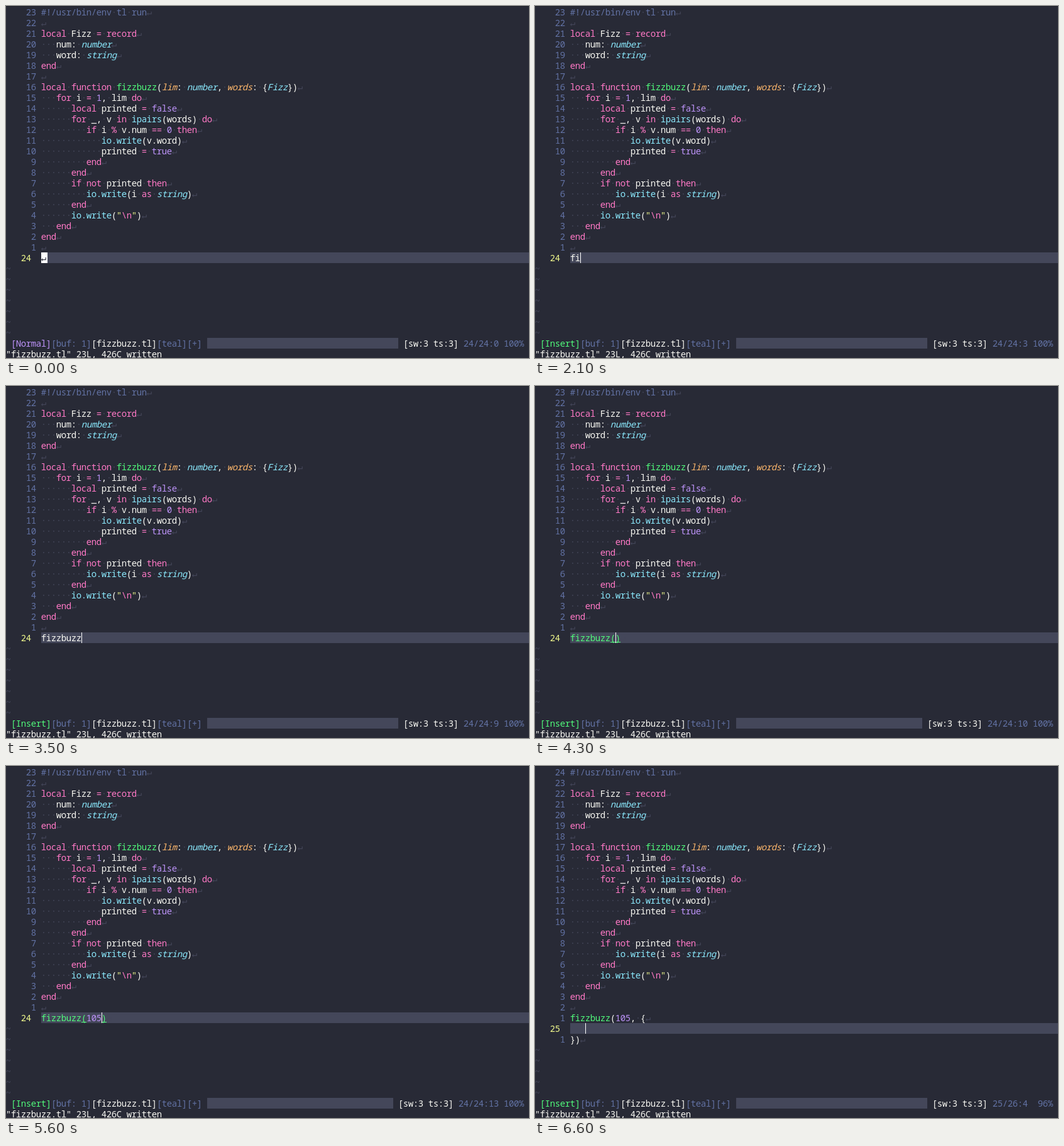
These frames come from a looping animation (832x560 px, 8000 ms). An HTML page with a canvas:

```html
<!DOCTYPE html>
<html lang="en">
<head>
<meta charset="utf-8">
<title>fizzbuzz.tl</title>
<style>
html, body { margin: 0; width: 100%; height: 100%; overflow: hidden; background: #282a36; }
canvas { display: block; }
</style>
</head>
<body>
<canvas id="term" width="832" height="560"></canvas>
<script>
const ctx = document.getElementById('term').getContext('2d');
const LOOP = 8000, CW = 8, CH = 17, TOP = 1, GUTTER = 7;
const FONT = '14px "Noto Sans Mono", "DejaVu Sans Mono", monospace';
const C = {
  bg: '#282a36', line: '#44475a', fg: '#f8f8f2', dim: '#6272a4', pink: '#ff79c6', cyan: '#8be9fd',
  green: '#50fa7b', orange: '#ffb86c', purple: '#bd93f9', yellow: '#f1fa8c'
};

const CODE = String.raw`#!/usr/bin/env tl run

local Fizz = record
   num: number
   word: string
end

local function fizzbuzz(lim: number, words: {Fizz})
   for i = 1, lim do
      local printed = false
      for _, v in ipairs(words) do
         if i % v.num == 0 then
            io.write(v.word)
            printed = true
         end
      end
      if not printed then
         io.write(i as string)
      end
      io.write("\n")
   end
end
`.split('\n');

// The bar marks the insertion point.
const STEPS = [
  [1500, '|'], [2100, 'fi|'], [2300, 'fiz|'], [2900, 'fizz|'],
  [3200, 'fizzb|'], [3300, 'fizzbu|'], [3400, 'fizzbuz|'], [3500, 'fizzbuzz|'],
  [3900, 'fizzbuzz(|'], [4000, 'fizzbuzz()|'], [4300, 'fizzbuzz(|)'],
  [5300, 'fizzbuzz(1|)'], [5500, 'fizzbuzz(10|)'], [5600, 'fizzbuzz(105|)'],
  [5900, 'fizzbuzz(105,|)'], [6000, 'fizzbuzz(105, |)'],
  [6400, 'fizzbuzz(105, |{'], [6600, 'fizzbuzz(105, {\n   |\n})']
];

// [pattern, colour, italic]
const RULES = [
  [/#!.*/y, C.dim],
  [/ +/y, C.line],
  [/\\n/y, C.pink],
  [/"/y, C.yellow],
  [/(?:local|function|record|end|for|do|in|if|then|not|as)\b|[=%]+/y, C.pink],
  [/(?:number|string)\b|(?<=\{)Fizz/y, C.cyan, true],
  [/(?:lim|words)(?=:)/y, C.orange, true],
  [/fizzbuzz(?=\()/y, C.green],
  [/io\.write|ipairs/y, C.cyan],
  [/(?:true|false)\b|\d+/y, C.purple],
  [/\w+|./y, C.fg]
];

function put(col, row, text, color, italic) {
  ctx.font = (italic ? 'italic ' : '') + FONT;
  ctx.fillStyle = color;
  [...text].forEach((ch, i) => {
    if (ch !== ' ') ctx.fillText(ch, (col + i) * CW + CW / 2, TOP + row * CH + 14);
  });
}

function fill(x, row, w, color) {
  ctx.fillStyle = color;
  ctx.fillRect(x, TOP + row * CH, w, CH);
}

function putCode(row, text) {
  let at = 0;
  while (at < text.length) {
    for (const [re, color, italic] of RULES) {
      re.lastIndex = at;
      const hit = re.exec(text);
      if (!hit) continue;
      put(GUTTER + at, row, hit[0], color, italic);
      at += hit[0].length;
      break;
    }
  }
  [...text].forEach((ch, i) => ch === ' ' && put(GUTTER + i, row, '·', C.line));
  put(GUTTER + text.length, row, '↵', C.line);
}

function markParen(row, col, ch) {
  fill((GUTTER + col) * CW, row, CW, C.line);
  put(GUTTER + col, row, ch, C.green);
  ctx.fillRect((GUTTER + col) * CW, TOP + row * CH + 15, CW, 1);
}

function status(insert, pos) {
  const parts = [
    insert ? ['[Insert]', C.green] : ['[Normal]', C.purple],
    ['[buf: 1]', C.dim], ['[fizzbuzz.tl]', C.fg], ['[teal][+]', C.dim]
  ];
  let col = 1;
  for (const [text, color] of parts) {
    put(col, 31, text, color);
    col += text.length;
  }
  const posCol = 103 - pos.length, tabCol = posCol - 12;
  fill((col + 1) * CW, 31, (tabCol - col - 2) * CW, C.line);
  put(tabCol, 31, '[sw:3 ts:3]', C.fg);
  put(posCol, 31, pos, C.dim);
  put(0, 32, '"fizzbuzz.tl" 23L, 426C written', C.fg);
}

function draw(t) {
  const step = STEPS.filter(s => s[0] <= t).pop();
  const insert = !!step;
  const typed = (insert ? step[1] : '|').split('\n');
  const split = typed.length > 1;
  const offset = typed.findIndex(s => s.includes('|'));
  const cursor = typed[offset].indexOf('|');
  const lines = CODE.slice(0, 23).concat(typed.map(s => s.replace('|', '')));
  const current = 23 + offset;

  ctx.fillStyle = C.bg;
  ctx.fillRect(0, 0, 832, 560);
  ctx.fillStyle = '#1e2029';
  ctx.fillRect(0, 0, 832, 1);
  fill(GUTTER * CW, current, 832, C.line);

  lines.forEach((text, row) => {
    if (row === current) put(3, row, String(row + 1), C.yellow);
    else put(4, row, String(Math.abs(row - current)).padStart(2), C.dim);
    putCode(row, text);
  });
  for (let row = lines.length; row < 31; row++) put(0, row, '~', C.line);

  const text = lines[current], pending = text.endsWith('{');
  if (!split && (text.endsWith(')') || pending)) {
    markParen(current, 8, '(');
    if (!pending) markParen(current, text.length - 1, ')');
  }

  const x = (GUTTER + cursor) * CW;
  fill(x, current, insert ? 1 : 10, '#ffffff');
  if (!insert) put(GUTTER, current, '↵', C.bg);

  const column = insert ? cursor + 1 : 0;
  status(insert, `${current + 1}/${lines.length}:${column} ${split ? ' 96%' : '100%'}`);
  if (pending) put(93, 32, '{', C.fg);
}

ctx.textAlign = 'center';
const start = performance.now();
function tick() {
  draw((performance.now() - start) % LOOP);
  requestAnimationFrame(tick);
}
tick();
</script>
</body>
</html>
```
